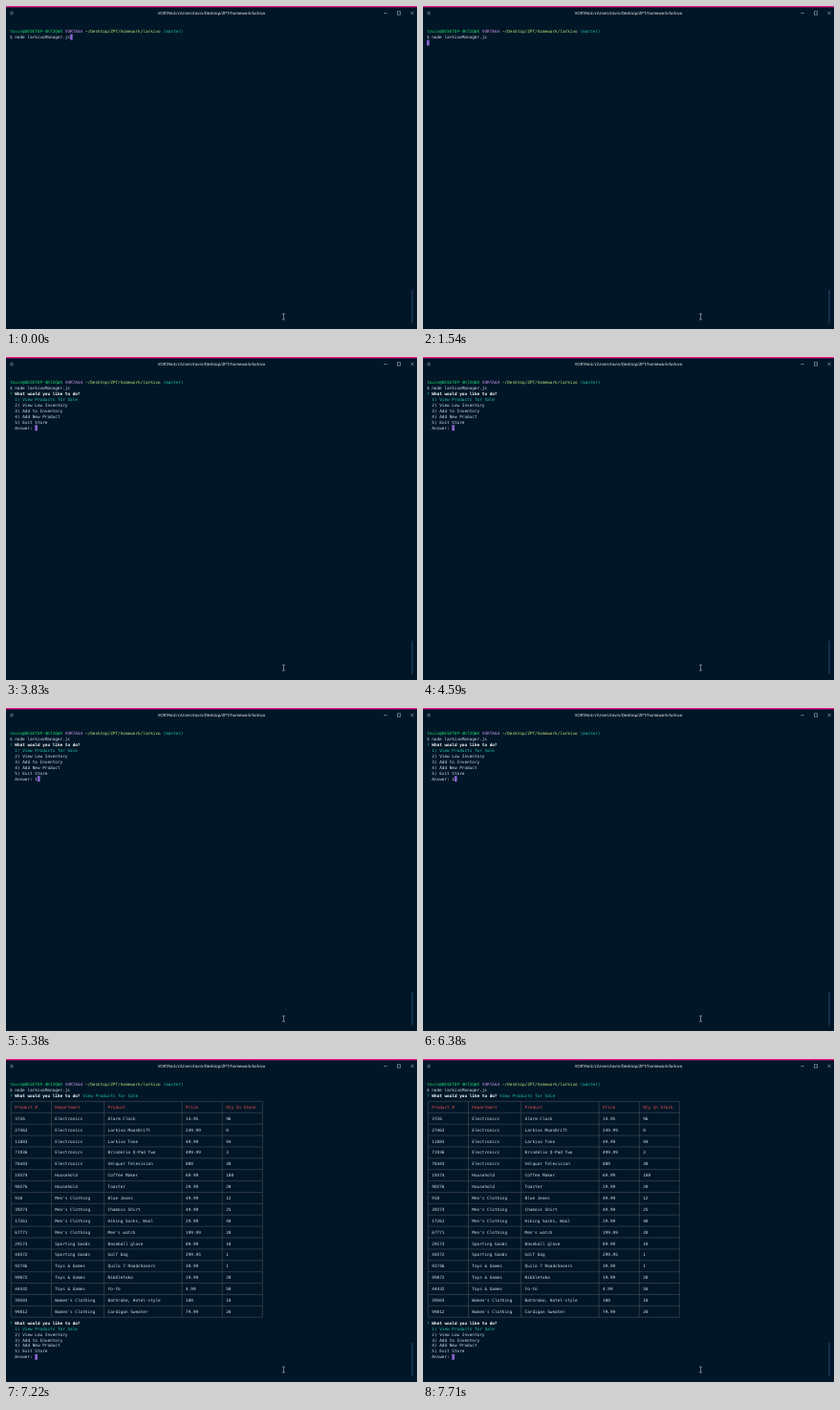
Animation of 430 by 338 pixels, one loop 8 s. Source, as an HTML page with a canvas:

```html
<!DOCTYPE html>
<html lang="en">
<head>
<meta charset="utf-8">
<title>Store manager</title>
<style>
html, body { margin: 0; width: 100%; height: 100%; overflow: hidden; background: #011627; }
canvas { display: block; width: 430px; height: 338px; }
</style>
</head>
<body>
<canvas id="stage"></canvas>
<script>
const LOOP = 8000;
const ENTER = 1280, MENU = 3830, TYPED = 5230, TABLE = 6660;
const LEFT = 4, TOP = 23.6, CELL = 2.63, ROW = 5.943, BASELINE = 4.5;
const C = {
  back: '#011627', text: '#d6deeb', bold: '#ffffff', green: '#22da6e', violet: '#c792ea',
  lime: '#c5e478', teal: '#21c7a8', red: '#ef5350', line: '#4b5054', cursor: '#8765d2',
  pink: '#f4148c', icon: '#8f9ba6', scroll: '#1d4266'
};
const QUESTION = 'What would you like to do?';
const OPTIONS = ['View Products for Sale', 'View Low Inventory', 'Add to Inventory', 'Add New Product', 'Exit Store'];
const EDGES = [0, 16, 37, 68, 84, 100];
const HEADER = 'Product #|Department|Product|Price|Qty In Stock';
const STOCK = `3726|Electronics|Alarm Clock|14.95|96
27463|Electronics|Larkivo MoonDrift|249.99|0
11883|Electronics|Larkivo Tone|49.99|94
71936|Electronics|Brindelio Q-Pad Two|499.99|3
76443|Electronics|Velquor Television|800|30
19374|Household|Coffee Maker|69.99|100
90276|Household|Toaster|29.99|20
918|Men's Clothing|Blue Jeans|49.99|12
39273|Men's Clothing|Chamois Shirt|49.99|25
17261|Men's Clothing|Hiking Socks, Wool|29.99|40
67771|Men's Clothing|Men's watch|199.99|20
29173|Sporting Goods|Baseball glove|89.99|10
44572|Sporting Goods|Golf bag|299.95|1
92746|Toys & Games|Quilo 7 Roadchasers|39.99|1
99872|Toys & Games|Nibbletoko|19.99|20
44432|Toys & Games|Yo-Yo|4.99|50
39503|Women's Clothing|Bathrobe, Hotel-style|100|10
99812|Women's Clothing|Cardigan Sweater|79.99|20`.split('\n');

const canvas = document.getElementById('stage');
const ratio = window.devicePixelRatio || 1;
canvas.width = 430 * ratio;
canvas.height = 338 * ratio;
const ctx = canvas.getContext('2d');
ctx.scale(ratio, ratio);
ctx.textRendering = 'geometricPrecision';

function rect(x, y, w, h, color) {
  ctx.fillStyle = color;
  ctx.fillRect(x, y, w, h);
}

function stroke(color, width, ...lines) {
  ctx.strokeStyle = color;
  ctx.lineWidth = width;
  ctx.beginPath();
  for (const [x1, y1, x2, y2] of lines) {
    ctx.moveTo(x1, y1);
    ctx.lineTo(x2, y2);
  }
  ctx.stroke();
}

function write(col, row, text, color = C.text, weight = '') {
  ctx.font = `${weight} 4.369px "DejaVu Sans Mono", monospace`;
  ctx.textAlign = 'left';
  ctx.fillStyle = color;
  ctx.fillText(text, LEFT + col * CELL, TOP + row * ROW + BASELINE);
}

function cursor(col, row) {
  rect(LEFT + col * CELL, TOP + row * ROW, CELL, ROW, C.cursor);
}

function drawWindow() {
  rect(0, 0, 430, 338, C.back);
  rect(0, 0, 430, 1.3, C.pink);
  ctx.font = '4.3px "Open Sans", sans-serif';
  ctx.textAlign = 'center';
  ctx.fillStyle = C.bold;
  ctx.fillText('VORTA64:/c/Users/tovin/Desktop/ZPT/homework/larkivo', 215, 9.1);
  stroke(C.icon, 0.5, [4.3, 6.2, 7.7, 6.2], [4.3, 7.5, 7.7, 7.5], [4.3, 8.8, 7.7, 8.8]);
  stroke(C.icon, 0.7, [395.3, 7.5, 398.7, 7.5],
    [423.4, 5.8, 426.6, 9], [426.6, 5.8, 423.4, 9]);
  ctx.strokeRect(409.4, 5.8, 3.3, 3.3);
  rect(424.4, 297, 1.2, 35, C.scroll);
}

function drawPointer() {
  stroke('#a2abb3', 0.7, [290.5, 322.4, 290.5, 327.8],
    [289, 322.2, 292, 322.2], [289, 328, 292, 328]);
}

function drawPrompt() {
  write(0, 0, 'tovin@DESKTOP-4K72QWX', C.green);
  write(22, 0, 'VORTA64', C.violet);
  write(30, 0, '~/Desktop/ZPT/homework/larkivo', C.lime);
  write(61, 0, '(master)', C.teal);
  write(0, 1, '$ node larkivoManager.js');
}

function drawQuestion(row) {
  write(0, row, '?', C.green);
  write(2, row, QUESTION, C.bold, 'bold');
}

function drawMenu(row, answer) {
  drawQuestion(row);
  OPTIONS.forEach((option, i) =>
    write(2, row + 1 + i, `${i + 1}) ${option}`, i ? C.text : C.teal));
  write(2, row + 6, 'Answer: ' + answer);
  cursor(10 + answer.length, row + 6);
}

function drawTable(row) {
  const rows = [HEADER, ...STOCK];
  const xs = EDGES.map(col => LEFT + (col + 0.5) * CELL);
  const lineY = i => TOP + (row + 2 * i + 0.5) * ROW;
  const across = Array.from({ length: rows.length + 1 }, (_, i) => [xs[0], lineY(i), xs[5], lineY(i)]);
  const down = xs.map(x => [x, lineY(0), x, lineY(rows.length)]);
  stroke(C.line, 0.6, ...across, ...down);
  rows.forEach((line, i) => line.split('|').forEach((text, j) =>
    write(EDGES[j] + 2, row + 1 + 2 * i, text, i ? C.text : C.red)));
}

function draw(t) {
  drawWindow();
  drawPrompt();
  if (t < ENTER) {
    cursor(24, 1);
  } else if (t < MENU) {
    cursor(0, 2);
  } else if (t < TABLE) {
    drawMenu(2, t < TYPED ? '' : '1');
  } else {
    drawQuestion(2);
    write(29, 2, OPTIONS[0], C.teal);
    drawTable(3);
    drawMenu(42, '');
  }
  drawPointer();
}

const start = performance.now();
function tick() {
  draw((performance.now() - start) % LOOP);
  requestAnimationFrame(tick);
}
tick();
</script>
</body>
</html>
```
